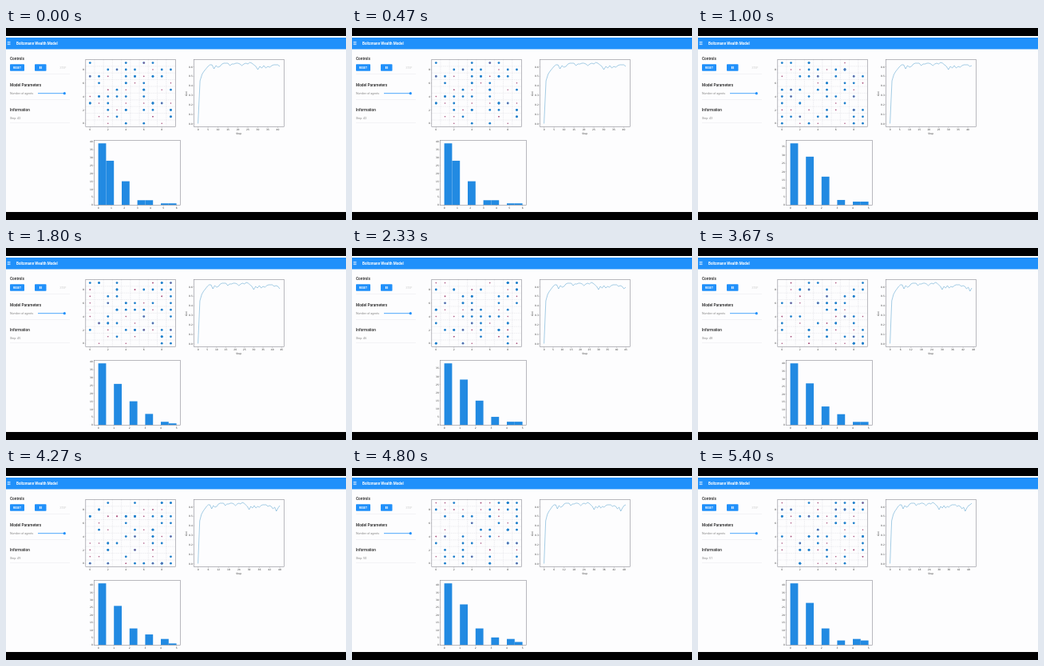
Animation of 426 by 240 pixels, one loop 5.47 s. Source, as an HTML page:

```html
<!DOCTYPE html>
<html lang="en">
<head>
<meta charset="utf-8">
<title>Boltzmann Wealth Model</title>
<style>
  html, body { margin: 0; width: 100%; height: 100%; overflow: hidden; background: #000; }
  svg { display: block; width: 100vw; height: 100vh; }
  .ui { font-family: Roboto, sans-serif; fill: #222; }
  .title { font-size: 4.6px; font-weight: 700; fill: #fff; }
  .head { font-size: 4.75px; font-weight: 500; }
  .small { font-size: 3.65px; fill: #858585; }
  .btn { font-size: 3.3px; font-weight: 700; fill: #fff; text-anchor: middle; }
  .off { font-weight: 400; fill: #ccc; }
  .tick { font: 3px "DejaVu Sans", sans-serif; fill: #333; text-anchor: middle; }
  .end { text-anchor: end; }
  .blue { fill: #2090fa; }
  .bar { fill: #228ae2; }
  .frame { fill: none; stroke: #8c8c94; stroke-width: .6; }
  .mark { stroke: #777; stroke-width: .4; }
  .grid { stroke: #d2d2da; stroke-width: .4; stroke-dasharray: 1.4 1; }
  .rule { stroke: #e6e6ea; stroke-width: .5; }
  .rich { fill: #2080cc; }
  .poor { fill: #a8507c; }
  .gini { fill: none; stroke: #4a9aca; stroke-width: .5; stroke-linejoin: round; }
</style>
</head>
<body>
<svg viewBox="0 0 426 240" preserveAspectRatio="none">
  <rect width="426" height="240"/>
  <rect y="10" width="426" height="220" fill="#fdfdfe"/>
  <rect class="blue" y="12" width="426" height="14.5"/>
  <path d="M1.7 17.4h3.8M1.7 19h3.8M1.7 20.6h3.8" stroke="#fff" stroke-width=".7"/>
  <g class="ui">
    <text class="title" x="13" y="20.6">Boltzmann Wealth Model</text>
    <text class="head" x="5" y="39.8">Controls</text>
    <rect class="blue" x="5" y="45.2" width="18" height="8.5" rx=".8"/>
    <text class="btn" x="14" y="50.7">RESET</text>
    <rect class="blue" x="36" y="45.2" width="14.5" height="8.5" rx=".8"/>
    <path d="M42.4 47.9v3.2M44.2 47.9v3.2" stroke="#fff"/>
    <text class="btn off" x="71.5" y="50.7">STEP</text>
    <path class="rule" d="M5 57.5h75M5 89.5h75M5 118.5h75"/>
    <text class="head" x="5" y="72.5">Model Parameters</text>
    <text class="small" x="5" y="83">Number of agents</text>
    <path d="M40 81.7h33" stroke="#2090fa" stroke-width=".8"/>
    <circle class="blue" cx="73.3" cy="81.7" r="1.6"/>
    <text class="head" x="5" y="104">Information</text>
    <text class="small" id="step" x="5" y="113.6"></text>
  </g>
  <g id="space"></g>
  <g id="agents"></g>
  <rect class="frame" x="99.8" y="39.6" width="112.7" height="84"/>
  <g id="giniAxis"></g>
  <text class="tick" x="291.7" y="133">Step</text>
  <text class="tick" transform="translate(227.4 82)rotate(-90)">Gini</text>
  <path class="gini" id="gini"/>
  <rect class="frame" x="235.6" y="39.6" width="112.7" height="84"/>
  <g id="hist"></g>
  <rect class="frame" x="110.6" y="140.4" width="108" height="81"/>
</svg>
<script>
const LOOP = 5470, STEP_MS = 570, LEAD = 60, FIRST = 41, AGENTS = 90;

// Height of the Gini curve at each model step, in stage units
const giniY = [
  119.5, 66, 58, 54, 51, 48, 46, 46, 51, 47, 49, 48, 45, 44, 44, 44, 47,
  45, 45, 44, 44, 45, 47, 45, 44, 45, 43, 44, 46, 48, 52, 48, 50, 47,
  50, 48, 49, 47, 46, 46, 46, 48, 47, 48, 51, 49, 54, 50, 47, 46, 44
];

// Agents per wealth level, one row per step
const wealth = [
  [39, 28, 15, 3, 3, 1, 1],
  [37, 29, 17, 3, 2, 2],
  [38, 28, 15, 5, 3, 1],
  [39, 26, 15, 7, 2, 1],
  [38, 28, 15, 5, 2, 2],
  [37, 30, 15, 4, 2, 2],
  [40, 27, 12, 7, 2, 2],
  [41, 26, 11, 7, 4, 1],
  [41, 27, 11, 5, 4, 2],
  [41, 28, 11, 3, 4, 3]
];

const $ = id => document.getElementById(id);
const cellX = c => 105.3 + 11.24 * c;
const cellY = r => 119.2 - 8.4 * r;

const xTick = (x, y, label) =>
  `<path class="mark" d="M${x} ${y}v1"/><text class="tick" x="${x}" y="${y + 4.5}">${label}</text>`;
const yTick = (x, y, label) =>
  `<path class="mark" d="M${x} ${y}h-1"/><text class="tick end" x="${x - 1.8}" y="${y + 1.1}">${label}</text>`;

function random(seed) {
  return () => (seed = seed * 16807 % 2147483647) / 2147483647;
}

// Random walk on a 10 x 10 torus, every agent moving to a neighbour cell
function walk() {
  const rnd = random(90210);
  const pick = n => Math.floor(rnd() * n);
  const step = ([c, r]) => {
    const d = (pick(8) + 5) % 9;
    return [(c + 9 + d % 3) % 10, (r + 9 + Math.floor(d / 3)) % 10];
  };
  let agents = Array.from({ length: AGENTS }, (_, i) => [i % 10, pick(10)]);
  return wealth.map(() => agents = agents.map(step));
}
const paths = walk();

function drawSpace() {
  let out = "";
  for (let i = 0; i < 9; i++) {
    out += `<path class="grid" d="M${cellX(i + .5)} 39.6v84M99.8 ${cellY(i + .5)}h112.7"/>`;
  }
  for (let i = 0; i < 10; i += 2) {
    out += xTick(cellX(i), 123.6, i) + yTick(99.8, cellY(i), i);
  }
  $("space").innerHTML = out;
}

function drawAgents(k) {
  $("agents").innerHTML = paths[k].map(([c, r], i) => {
    const poor = i * 37 % AGENTS < wealth[k][0];
    return `<circle class="${poor ? "poor" : "rich"}" cx="${cellX(c)}" cy="${cellY(r)}" r="${poor ? .8 : 1.4}"/>`;
  }).join("");
}

function drawGini(n) {
  const x = i => 240.6 + 102.4 * i / n;
  const gap = n < 46 ? 5 : 6;
  let axis = "";
  for (let i = 0; x(i) < 348; i += gap) axis += xTick(x(i), 123.6, i);
  for (let i = 0; i < 7; i++) axis += yTick(235.6, 119.6 - 11.85 * i, (i / 10).toFixed(1));
  $("giniAxis").innerHTML = axis;
  $("gini").setAttribute("d", "M" + giniY.slice(0, n + 1).map((y, i) => `${x(i)} ${y}`).join("L"));
}

function drawHist(k) {
  const counts = wealth[k], top = counts.length - 1;
  const left = 115.6, width = 98, base = 221.2, unit = 77 / counts[0];
  let out = "";
  counts.forEach((count, v) => {
    const bin = Math.min(9, Math.floor(v * 10 / top));
    out += `<rect class="bar" x="${left + bin * width / 10}" y="${base - count * unit}" width="${width / 10}" height="${count * unit}"/>`;
    out += xTick(left + v * width / top, 221.4, v);
  });
  for (let v = 0; v <= counts[0] * 1.05; v += 5) out += yTick(110.6, base - v * unit, v);
  $("hist").innerHTML = out;
}

let shown = -1;
function frame() {
  const t = performance.now() % LOOP;
  const k = Math.min(wealth.length - 1, Math.floor((t + LEAD) / STEP_MS));
  if (k !== shown) {
    shown = k;
    $("step").textContent = `Step: ${FIRST + k + 1}`;
    drawAgents(k);
    drawGini(FIRST + k);
    drawHist(k);
  }
  requestAnimationFrame(frame);
}

drawSpace();
frame();
</script>
</body>
</html>
```
